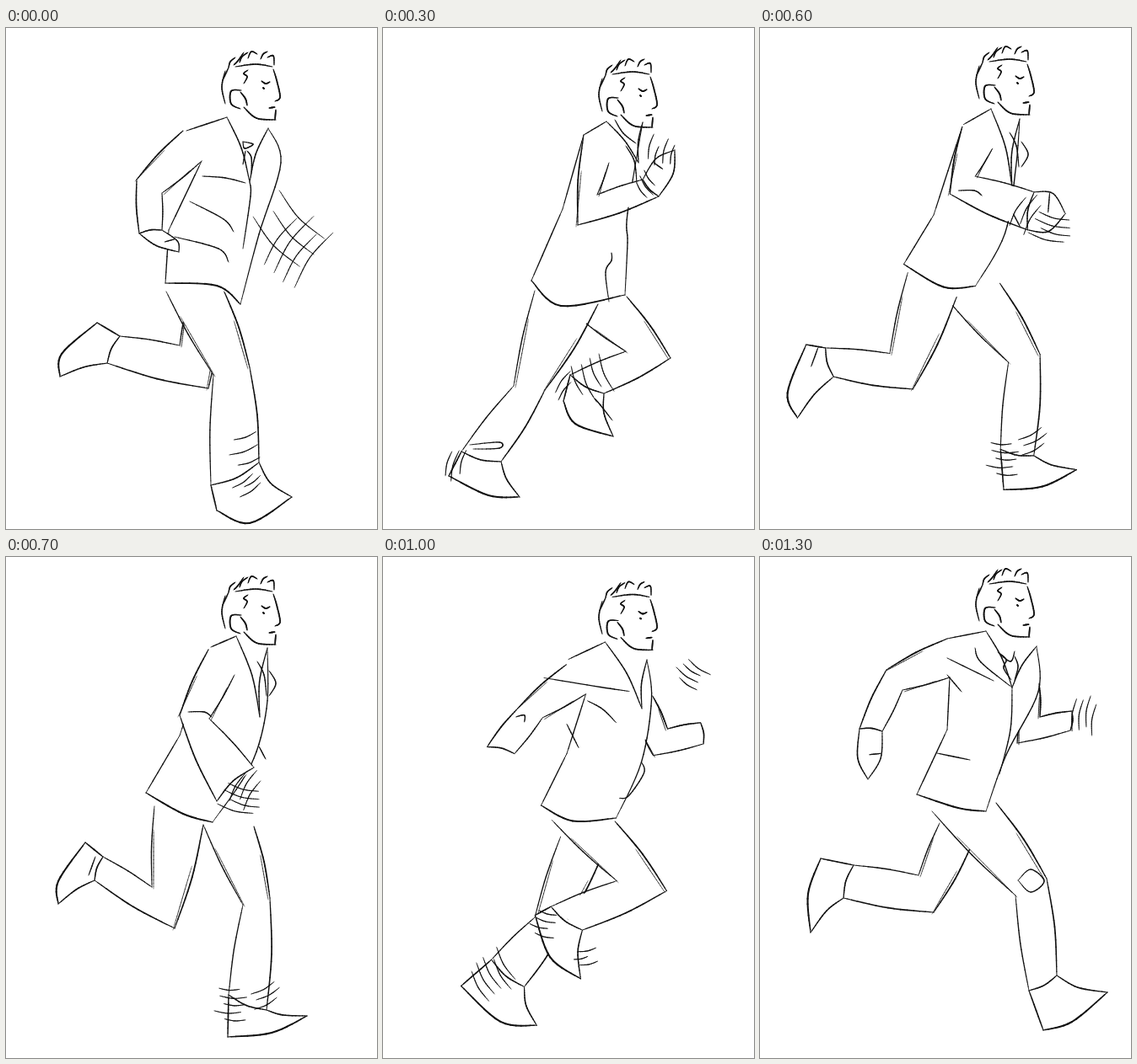
An HTML page with a canvas for the animation above (1.4 s loop, 440 px wide and 595 px high).

```html
<!DOCTYPE html>
<html lang="en">
<head>
<meta charset="utf-8">
<title>Run cycle</title>
<style>
html, body { margin: 0; width: 100%; height: 100%; overflow: hidden; background: #fff; }
canvas { display: block; }
</style>
</head>
<body>
<canvas id="stage" width="440" height="595"></canvas>
<script>
const ctx = document.getElementById('stage').getContext('2d');
const STEP = 100, STEPS = 14, EYE = [305, 71];
const poses = [];

function points(text) {
  const n = text.split(' ').map(Number);
  return n.filter((_, i) => i % 2 === 0).map((x, i) => [x, n[2 * i + 1]]);
}
const strokes = text => text.split(';').map(points);

// torso: nape, shoulder, waist, hem back, hem middle, hem front, front, chest, throat, button
// limbs: both sides of root, joint and end, then heel, ball and toe or the fingertip
function addPose(at, eyeY, torso, legN, legF, armN, armF, details, swishes) {
  poses.push({
    at, eyeY, swishes,
    torso: points(torso), legN: points(legN), legF: points(legF),
    armN: points(armN), armF: armF && points(armF), details: strokes(details)
  });
}

const hair = strokes('264 47 266 40 272 35;270 44 275 39 282 29;277 41 280 34 287 29;287 36 291 28 298 31;302 37 305 31 310 28;310 35 317 33 318 44;272 46 296 43 316 46;257 62 264 47;260 51 256 70 260 90;287 50 282 54 286 58 282 66');
const face = strokes('279 74 267 75 267 90 278 96;278 76 284 84 286 92;282 94 297 107 320 109;320 97 319 109;317 49 321 62 325 82 319 87;303 63 308 66 313 64;305 71 306 72;312 95 319 94');

addPose(0, 71,
  '262 106 214 122 193 240 189 303 250 306 278 328 300 245 326 160 311 119 289 183',
  '258 311 190 313 289 403 246 412 300 516 243 543 250 573 289 588 339 557',
  '258 311 215 330 240 428 206 377 120 398 135 366 108 350 66 387 64 414',
  '210 122 232 158 155 180 185 196 158 244 185 240 205 266', null,
  '281 135 293 138 283 143 281 135;284 146 281 162;286 146 291 154 291 172;233 176 260 178 284 184;218 206 258 227 270 242;200 248 252 262 264 278;289 183 290 200 281 262',
  [[338, 240, 47, 85, 3, 22], [345, 265, 125, 85, 4, 15], [284, 500, -20, 36, 3, 15], [288, 541, -35, 30, 3, 7]]);

addPose(3, 80,
  '265 111 238 127 213 215 176 300 211 330 287 317 290 255 290 220 308 112 303 160',
  '255 328 180 312 192 430 155 425 140 515 93 503 78 532 125 555 162 557',
  '289 319 236 347 341 392 288 384 262 434 222 412 214 443 228 470 273 485',
  '238 127 268 160 231 234 254 198 327 200 308 180 346 145', null,
  '275 109 285 125 300 137;288 140 298 158 301 184;271 267 271 276 264 290 268 325;103 495 138 492 138 499 107 500;251 440 258 448 272 466',
  [[312, 186, 55, 28, 3, 8], [330, 148, 103, 30, 4, 9], [86, 518, 105, 38, 3, 8], [248, 415, 68, 48, 4, 12], [215, 425, 125, 32, 2, 8]]);

addPose(5, 64,
  '275 98 240 122 206 232 175 281 225 310 266 298 291 240 298 150 306 108 297 190',
  '232 321 175 285 164 414 137 378 88 433 56 407 38 413 30 480 55 507',
  '270 287 221 333 347 363 304 374 335 472 303 472 311 518 350 517 389 497',
  '240 125 280 146 249 199 258 162 337 171 322 143 357 130', null,
  '295 228 309 248 298 260 290 264;288 263 295 276 294 288 276 284;226 246 258 265;225 247 213 262;213 263 250 273;217 150 194 178 195 218;252 220 286 198;301 118 307 122 299 138',
  [[318, 468, -18, 72, 4, 9], [75, 437, 50, 30, 3, 9], [342, 165, 103, 34, 5, 11], [350, 506, -22, 55, 3, 9]]);

addPose(7, 66,
  '273 94 243 107 206 212 166 280 210 305 245 315 290 248 309 180 310 108 301 190',
  '234 318 176 296 200 441 173 392 105 384 115 356 94 339 62 385 62 412',
  '294 320 234 318 313 405 281 413 309 538 264 520 263 570 315 565 357 545',
  '240 110 271 140 206 188 241 192 250 290 294 250 298 305', null,
  '298 124 306 140 309 165;300 225 308 240;216 184 235 184 244 190;312 135 320 150 312 165;106 356 98 378',
  [[268, 531, 3, 32, 5, 9], [308, 520, -28, 35, 3, 9], [280, 287, 15, 45, 4, 9], [285, 275, 120, 45, 3, 10]]);

addPose(9, 73,
  '262 101 228 124 212 242 172 288 215 320 263 320 298 252 311 178 300 122 308 160',
  '265 322 191 313 306 420 243 384 190 406 163 362 157 368 147 415 166 456',
  '270 330 215 330 240 450 212 432 215 520 158 505 136 541 190 552 241 552',
  '222 140 262 170 178 198 220 202 150 242 195 245',
  '309 200 298 235 328 228 300 250 368 236 362 261',
  '230 196 248 208;228 208 250 215;232 218 249 232;230 122 258 132 256 142;263 114 274 120;238 455 250 450 246 461 233 460;281 298 275 332;200 520 202 540',
  [[172, 258, -12, 72, 5, 8], [387, 240, 105, 50, 5, 9], [205, 488, 28, 90, 5, 10], [148, 524, 125, 40, 3, 10]]);

addPose(11, 72,
  '265 101 212 119 224 225 203 302 235 307 290 300 315 235 326 160 326 122 306 200',
  '285 306 210 312 362 370 314 376 307 458 267 447 243 476 285 510 329 514',
  '255 362 208 335 192 428 155 420 128 490 110 452 62 472 90 542 124 545',
  '212 119 220 152 142 162 159 174 97 207 117 216 105 250',
  '330 130 318 185 345 183 342 219 378 162 390 184 405 148',
  '183 141 250 152 284 157;222 160 240 170 256 186;224 190 238 218;140 172 150 170 150 178;315 235 318 248 300 275 289 278',
  [[112, 470, 60, 48, 5, 10], [258, 467, 15, 26, 4, 9], [310, 490, -12, 22, 3, 8], [378, 138, 35, 32, 4, 8]]);

addPose(13, 57,
  '268 88 222 97 222 205 186 282 235 298 268 302 292 235 330 160 328 106 299 155',
  '280 292 204 302 340 382 303 402 352 497 319 515 336 562 370 552 412 517',
  '252 340 213 316 206 422 188 378 99 405 111 366 72 358 57 400 60 446',
  '222 97 225 143 150 134 169 158 118 204 145 207 128 264',
  '331 150 308 195 332 190 305 221 370 183 368 206',
  '282 113 297 124 302 112;284 114 292 122 289 132 298 146;302 118 306 130 302 146;255 108 262 125 299 155;210 233 249 241;222 120 277 147;222 140 239 160;306 384 321 371 337 385 321 398 306 384;299 155 297 205 284 258',
  [[385, 187, 98, 42, 4, 8]]);

const lerp = (a, b, k) => a + (b - a) * k;
const mix = (p, q, k) => [lerp(p[0], q[0], k), lerp(p[1], q[1], k)];
const add = (p, q, k = 1) => [p[0] + q[0] * k, p[1] + q[1] * k];
const sub = (p, q) => add(p, q, -1);

// Swing one vector into another by angle and length
function swing(a, b, k) {
  const turn = Math.atan2(a[0] * b[1] - a[1] * b[0], a[0] * b[0] + a[1] * b[1]);
  const angle = Math.atan2(a[1], a[0]) + turn * k;
  const len = lerp(Math.hypot(...a), Math.hypot(...b), k);
  return [len * Math.cos(angle), len * Math.sin(angle)];
}

function blendLimb(a, b, k) {
  const out = [];
  let pa, pb, mid;
  for (let i = 0; i < 6; i += 2) {
    const ma = mix(a[i], a[i + 1], 0.5), mb = mix(b[i], b[i + 1], 0.5);
    mid = i ? add(mid, swing(sub(ma, pa), sub(mb, pb), k)) : mix(ma, mb, k);
    const half = swing(sub(a[i], ma), sub(b[i], mb), k);
    out.push(add(mid, half), sub(mid, half));
    [pa, pb] = [ma, mb];
  }
  for (let i = 6; i < Math.min(a.length, b.length); i++) {
    out.push(add(mid, swing(sub(a[i], pa), sub(b[i], pb), k)));
  }
  return out;
}

function blend(a, b, k) {
  const now = {
    eyeY: lerp(a.eyeY, b.eyeY, k),
    torso: a.torso.map((p, i) => mix(p, b.torso[i], k))
  };
  for (const limb of ['legN', 'legF', 'armN']) now[limb] = blendLimb(a[limb], b[limb], k);
  if (a.armF && b.armF) now.armF = blendLimb(a.armF, b.armF, k);
  else now.armF = (k < 0.5 ? a : b).armF;
  return now;
}

function spline(a, b, c, d, t) {
  return b + t * ((c - a) + t * ((2 * a - 5 * b + 4 * c - d) + t * (3 * (b - c) + d - a))) / 2;
}

// Smooth line that thins out at both ends
function brush(pts, width = 1.4) {
  const last = pts.length - 1, total = last * 8;
  const at = i => pts[Math.max(0, Math.min(last, i))];
  let prev = pts[0];
  for (let n = 1; n <= total; n++) {
    const i = Math.min(last - 1, Math.floor(n / 8)), t = n / 8 - i;
    const next = [0, 1].map(k => spline(at(i - 1)[k], at(i)[k], at(i + 1)[k], at(i + 2)[k], t));
    ctx.lineWidth = width * (0.4 + 0.6 * Math.sqrt(Math.sin(Math.PI * (n - 0.5) / total)));
    ctx.beginPath();
    ctx.moveTo(...prev);
    ctx.lineTo(...next);
    ctx.stroke();
    prev = next;
  }
}

function bow(p, q, amount, width) {
  const [dx, dy] = sub(q, p);
  brush([p, add(mix(p, q, 0.5), [dy, -dx], amount), q], width);
}

function cover(pts) {
  ctx.beginPath();
  pts.forEach(p => ctx.lineTo(...p));
  ctx.fill();
}

function limb([a0, b0, a1, b1, a2, b2]) {
  cover([a0, a1, a2, b2, b1, b0]);
  const side = Math.sign((a0[0] - b0[0]) * (a1[1] - a0[1]) - (a0[1] - b0[1]) * (a1[0] - a0[0]));
  bow(a0, a1, side * 0.03, 1.8);
  bow(a1, a2, side * 0.03, 1.7);
  bow(b0, b1, -side * 0.02);
  bow(b1, b2, -side * 0.02);
  // Loose second pass
  bow(mix(a0, a1, 0.4), add(a1, [-2, 2]), 0, 0.8);
  bow(mix(b0, b1, 0.3), add(b1, [2, 2]), 0, 0.8);
  bow(a2, b2, 0.08, 1.6);
}

function leg(pts) {
  const [heel, ball, toe] = pts.slice(6), a = pts[4], b = pts[5];
  cover([a, b, heel, ball, toe]);
  brush([b, heel], 1.7);
  brush([heel, ball, toe], 2.1);
  brush([toe, add(mix(toe, a, 0.5), sub(ball, toe), 0.12), a], 1.6);
  limb(pts);
}

function arm(pts) {
  const a = pts[4], b = pts[5], tip = pts[6];
  if (tip) {
    const reach = sub(tip, mix(a, b, 0.5));
    const hand = [a, add(a, reach, 0.6), tip, add(b, reach, 0.55), b];
    cover(hand);
    brush(hand.slice(0, 3), 1.6);
    brush(hand.slice(2));
    brush([add(b, reach, 0.45), add(mix(a, b, 0.5), reach, 0.5)]);
  }
  limb(pts);
}

function body({ torso, armN }) {
  const [nape, shoulder, waist, back, hem, front, edge, chest, throat, button] = torso;
  const forward = armN[4][0] - armN[2][0] > 30;
  cover(torso.slice(0, 9));
  brush([nape, shoulder]);
  brush([armN[forward ? 0 : 1], waist]);
  brush([waist, back]);
  brush([back, hem, front], 2);
  brush([front, edge, chest, throat]);
  bow(nape, button, 0.05, 1.5);
  bow(throat, button, -0.06, 1.5);
}

// Details ride along with the closest point of the figure
const anchors = p => [p.torso, p.legN, p.legF, p.armN].map(part => part.slice(0, part === p.torso ? 10 : 6)).flat();
function follow(pose, now, at) {
  const from = anchors(pose), to = anchors(now);
  const dist = from.map(p => Math.hypot(...sub(p, at)));
  const i = dist.indexOf(Math.min(...dist));
  return sub(to[i], from[i]);
}

function swish([x, y, degrees, length, count, gap], shift) {
  const r = degrees * Math.PI / 180, dir = [Math.cos(r), Math.sin(r)];
  for (let i = 0; i < count; i++) {
    const slide = 5 * Math.sin(x + i * 2.4), half = length * (0.44 + 0.06 * Math.cos(y + i * 3));
    const mid = add(add([x + shift[0], y + shift[1]], [-dir[1], dir[0]], (i - (count - 1) / 2) * gap), dir, slide);
    bow(add(mid, dir, -half), add(mid, dir, half), -0.07, 1.2);
  }
}

function draw(step) {
  let n = poses.length - 1;
  while (poses[n].at > step) n--;
  const a = poses[n], b = poses[(n + 1) % poses.length];
  const k = (step - a.at) / ((b.at || STEPS) - a.at);
  const now = blend(a, b, k), pose = k < 0.5 ? a : b;
  ctx.fillStyle = '#fff';
  ctx.fillRect(0, 0, 440, 595);
  ctx.strokeStyle = '#111';
  ctx.lineCap = 'round';
  if (now.armF) arm(now.armF);
  leg(now.legF);
  leg(now.legN);
  body(now);
  arm(now.armN);
  const nod = [0, now.eyeY - EYE[1]];
  for (const line of hair) brush(line.map(p => add(p, nod)), 1.6);
  for (const line of face) brush(line.map(p => add(p, nod)), 1.8);
  for (const line of pose.details) {
    const shift = follow(pose, now, line[0]);
    brush(line.map(p => add(p, shift)));
  }
  for (const s of pose.swishes) swish(s, follow(pose, now, s));
}

let start, shown;
function tick(time) {
  start ??= time;
  const step = Math.floor((time - start) / STEP) % STEPS;
  if (step !== shown) draw(shown = step);
  requestAnimationFrame(tick);
}
draw(shown = 0);
requestAnimationFrame(tick);
</script>
</body>
</html>
```
